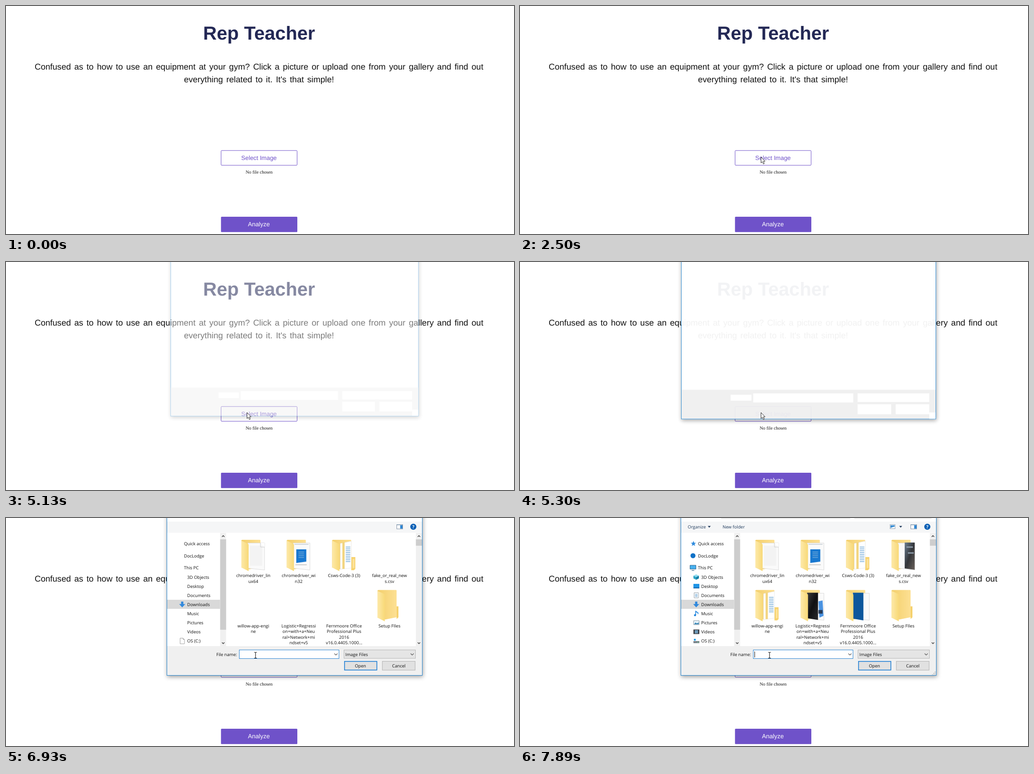
Recreate the animation shown at these times as an HTML page. Size 1116 px wide and 502 px high, loop 8000 ms.

```html
<!DOCTYPE html>
<html lang="en">
<head>
<meta charset="utf-8">
<title>Image upload demo</title>
<style>
  html, body { margin: 0; width: 100%; height: 100%; overflow: hidden; background: #fff; }
  svg { display: block; width: 100%; height: 100%; }
  text { text-rendering: geometricPrecision; }
  .page { font-family: "Liberation Sans", Arial, sans-serif; }
  .mid { text-anchor: middle; }
  .intro { font-size: 18.6px; word-spacing: 2.19px; fill: #111; }
  .ui { font: 9.55px "Open Sans", "Noto Sans", sans-serif; fill: #111; }
  .chev { fill: none; stroke: #444; stroke-width: 1.1; }
  .blank { fill: #fff; }
</style>
</head>
<body>
<svg viewBox="0 0 1116 502" xmlns="http://www.w3.org/2000/svg">
  <defs>
    <filter id="shadow" x="-10%" y="-10%" width="120%" height="125%">
      <feDropShadow dx="1" dy="3" stdDeviation="5" flood-color="#000" flood-opacity=".38"/>
    </filter>
    <linearGradient id="back"><stop offset="0" stop-color="#f3cf6c"/><stop offset="1" stop-color="#fde093"/></linearGradient>
    <linearGradient id="flap"><stop offset="0" stop-color="#fde9a9"/><stop offset="1" stop-color="#f8d978"/></linearGradient>
    <linearGradient id="dusk" x2="1" y2="1"><stop offset="0" stop-color="#6c7f92"/><stop offset=".5" stop-color="#333539"/><stop offset="1" stop-color="#6b625c"/></linearGradient>
    <linearGradient id="night" x2="1" y2="1"><stop offset="0" stop-color="#3a3a3c"/><stop offset=".5" stop-color="#101012"/><stop offset="1" stop-color="#29292c"/></linearGradient>
  </defs>
  <rect width="1116" height="502" fill="#fff"/>

  <g class="page mid">
    <text x="556" y="74" font-size="41.5" font-weight="700" fill="#232855">Rep Teacher</text>
    <text class="intro" x="555.8" y="140">Confused as to how to use an equipment at your gym? Click a picture or upload one from your gallery and find out</text>
    <text class="intro" x="555.8" y="167.5">everything related to it. It's that simple!</text>
    <rect x="472.5" y="318.2" width="167" height="32.5" rx="1.5" fill="#fff" stroke="#6f52c9"/>
    <text x="555.8" y="339" font-size="13.35" fill="#6f52c9">Select Image</text>
    <text x="556" y="369" font-size="10.1" fill="#111" font-family="Liberation Serif, Times, serif">No file chosen</text>
    <rect x="472.3" y="464" width="167.7" height="33.7" rx="1.5" fill="#6f52c9"/>
    <text x="555.6" y="485" font-size="13.5" fill="#fff">Analyze</text>
  </g>

  <g id="dialog">
    <rect x="353.5" y="-40" width="561" height="386.5" fill="#fff" stroke="#2484cf" filter="url(#shadow)"/>
    <rect x="354" y="282" width="560" height="64" fill="#f0f0f0"/>
    <g id="blanks">
      <path class="blank" d="M462 293h46v13h-46zM512 290h220.500v20h-220.500zM742 290h158v19h-158zM742 314h74v22h-74zM826 314h74v22h-74zM900 332h14v14h-14z"/>
      <g id="bar">
        <rect x="900.500" y="47" width="13.500" height="221" fill="#f0f0f0"/>
        <rect x="900.500" y="47" width="13.500" height="104" fill="#cdcdcd"/>
      </g>
    </g>
    <g id="full">
      <rect x="354" y="8" width="560" height="24.500" fill="#f5f6f7"/>
      <g fill="#f0f0f0"><rect x="470.500" y="33" width="13" height="249"/><rect x="900.500" y="33" width="13.500" height="249"/></g>
      <g fill="#cdcdcd"><rect x="470.500" y="47" width="13" height="199"/><rect x="900.500" y="47" width="13.500" height="14"/></g>
      <path class="chev" style="stroke-width:1.6" d="M474.500 41.500l2.700-2.700 2.700 2.700M474.500 274l2.700 2.700 2.700-2.700M904.500 41.500l2.700-2.700 2.700 2.700M904.500 274l2.700 2.700 2.700-2.700"/>
      <rect x="354" y="180" width="116" height="20" fill="#d9d9d9"/>
      <g id="side" class="ui"></g>
      <path d="M384.600 184h5v5.500h4.200l-6.700 7.300-6.700-7.300h4.200z" fill="#3289dc"/>
      <path id="doc" d="M382.500 264.500h6.500l3 3v9.500h-9.500zM389 264.500v3h3" fill="#fff" stroke="#888" stroke-width=".8"/>
      <g id="names" class="ui mid"></g>
      <rect x="858.500" y="14.500" width="13" height="9.500" fill="#fff" stroke="#7c8fa3"/>
      <rect x="866" y="16" width="5" height="7.500" fill="#2f86d3"/>
      <path d="M859 15h12" stroke="#8ca6bd" stroke-width="1.500"/>
      <circle cx="894.800" cy="19.200" r="6.700" fill="#0b60b5"/>
      <text class="mid" x="894.800" y="22.900" font-size="10" font-weight="700" fill="#fff" font-family="Open Sans, sans-serif">?</text>
      <text class="ui" x="462" y="303.500">File name:</text>
      <rect x="512.500" y="290.500" width="219" height="19" fill="#fff" stroke="#2a84d2"/>
      <rect x="742.500" y="290.500" width="157" height="18.500" fill="#e5e5e5" stroke="#b5b5b5"/>
      <path class="chev" d="M721.500 298.500l3.300 3.300 3.300-3.300M889 298.500l3.300 3.300 3.300-3.300"/>
      <text class="ui" x="745.500" y="303.500">Image Files</text>
      <rect x="743.700" y="315.700" width="71" height="19" fill="#e1e1e1" stroke="#1a7cd4" stroke-width="1.600"/>
      <rect x="826.800" y="315.500" width="72" height="19.500" fill="#e1e1e1" stroke="#b0b0b0"/>
      <text class="ui mid" x="778.700" y="328.500">Open</text>
      <text class="ui mid" x="863" y="328.500">Cancel</text>

      <g id="tools">
        <path d="M442 .5h283.500M734.500 .5h169.500" stroke="#d4d4d4"/>
        <g class="ui" style="fill:#1e395b">
          <text x="368.500" y="22.500">Organize</text>
          <text x="445" y="22.500">New folder</text>
        </g>
        <path d="M412.500 17.500h6.600l-3.300 3.800zM833 17.500h6.600l-3.300 3.800z" fill="#1e395b"/>
        <rect x="813" y="14.500" width="11" height="9" fill="#fff" stroke="#8ca0b3"/>
        <path d="M814 16h9v3l-4 1-5 2z" fill="#3d8fd4"/>
        <path d="M911 338h2v2h-2zM911 341h2v2h-2zM908 341h2v2h-2zM911 344h2v1.500h-2zM908 344h2v1.500h-2zM905 344h2v1.500h-2z" fill="#bfbfbf"/>

        <path d="M381 50.500l1.600 3.900 4.100.3-3.200 2.600 1.100 4.200-3.600-2.300-3.600 2.300 1.100-4.200-3.200-2.600 4.100-.3z" fill="#2f8bdd"/>
        <circle cx="380" cy="83" r="5.500" fill="#1071c7"/>
        <path d="M373.500 104h13v8.500h-13z" fill="#47b0ee" stroke="#39678c"/>
        <path d="M377 115.500h6" stroke="#39678c" stroke-width="1.300"/>
        <path d="M381 127l6-3 6 3-6 3z" fill="#8fdcf0"/><path d="M381 127l6 3v6l-6-3z" fill="#2ba4c6"/><path d="M393 127l-6 3v6l6-3z" fill="#147fa6"/>
        <path d="M381 145h13v10h-13z" fill="#1f95e6"/><path d="M381 153h13v2h-13z" fill="#1266ad"/>
        <path d="M382.500 164.500h9.500v11.500h-9.500z" fill="#fff" stroke="#8a969f" stroke-width=".9"/>
        <path d="M384.500 168h5.500M384.500 170.500h5.500M384.500 173h5.500" stroke="#4d93ca"/>
        <path d="M386 213.500v-9q1 3 5 4v3" fill="none" stroke="#1d83dc" stroke-width="1.600"/><circle cx="384.500" cy="214" r="2.300" fill="#1d83dc"/>
        <path d="M381.500 226h12v9h-12z" fill="#eaf5fc" stroke="#8999a5"/><path d="M382.500 234l3-4 3 2 4-2v4z" fill="#3686b5"/>
        <path d="M381 245.500h13v10h-13z" fill="#3d4248"/><path d="M384 247h7v7h-7z" fill="#6b98b8"/>
        <path d="M381 271h13v4.500h-13z" fill="#778088"/><path d="M382 266h4v4h-4z" fill="#23a0e5"/><path d="M390 273h2v1.200h-2z" fill="#6cf08c"/>
      </g>
      <g id="folders"></g>
      <path id="caret" d="M515.600 294v13" stroke="#000"/>
    </g>
  </g>

  <path id="arrow" d="M.5 .5V13.600L3.500 10.800 5.600 15.800 7.800 14.800 5.700 9.900H9.400Z" fill="#fff" stroke="#111" stroke-width=".9"/>
  <path id="beam" d="M545.200 295.700h2.200l.8.700.8-.7h2.200M548.200 296.400v11.400M545.200 308.500h2.200l.8-.7.8.7h2.200" fill="none" stroke="#111" stroke-width="1.100"/>
  <g id="ring" fill="none" stroke-width="3.200">
    <circle r="4.900" stroke="#2196e5"/>
    <path d="M-4.900 0A4.900 4.900 0 0 1 0 -4.900" stroke="#67bdf1"/>
  </g>
</svg>

<script>
const LOOP = 8000;
const $ = id => document.getElementById(id);

// Sidebar: label, x, vertical centre
const places = [
  ["Quick access", 391, 56], ["DocLodge", 391, 83], ["This PC", 391, 109.5],
  ...["3D Objects", "Desktop", "Documents", "Downloads", "Music", "Pictures", "Videos", "OS (C:)"]
    .map((name, i) => [name, 398, 130 + i * 20.08])
];
$("side").innerHTML = places
  .map(([name, x, y]) => `<text x="${x}" y="${y + 3.5}">${name}</text>`).join("");

const sheet = '<path d="M14 7h37v59.500l-37-4z" fill="#fafafa" stroke="#d2d2d2" stroke-width=".8"/>';
const lines = (x, y, n, w) => Array.from({ length: n }, (_, i) =>
  `<path d="M${x} ${y + i * 4}h${w}" stroke="#6fa9d8" stroke-width="1.500"/>`).join("");
const stack = '<path d="M42 38h9v26l-3 3h-6z" fill="#f7d36f"/>' +
  '<path d="M18 8l24-5v59l-24 3z" fill="#fff" stroke="#ddd" stroke-width=".6"/>' +
  '<path d="M25 5v59" stroke="#f2d581" stroke-width="5"/>' +
  lines(30, 16, 9, 10) + '<path d="M47 42v20" stroke="#fde39b" stroke-width="4"/>';

const inserts = {
  paper: sheet + '<path d="M19 13h27v44h-27z" fill="#f3f3f3"/><path d="M42 7l9 9v-9z" fill="#fff"/><path d="M42 7v9h9" fill="none" stroke="#ccc"/>',
  app: sheet + '<path d="M17 10h31" stroke="#cfd6dc" stroke-width="2"/><path d="M21 21h22v27l-22 3z" fill="#1878d0"/>' + lines(26, 27, 4, 12) + '<path d="M19 55h25" stroke="#ccc" stroke-width="2"/>',
  stack,
  dusk: sheet + '<path d="M29 6h22v60l-22-3z" fill="url(#dusk)"/><path d="M33 16h14M36 29h13" stroke="#8c9aa8" stroke-width="3"/>',
  night: sheet + '<path d="M14 6h24v60l-24-4z" fill="url(#night)"/><path d="M39 25l9-2 2 34-9 4z" fill="#4a93e2"/><path d="M39 44h9v8h-9z" fill="#273a55"/>',
  blue: sheet + '<path d="M15 6h23v61l-23-4z" fill="#0d579c"/>',
  empty: '<path d="M42 36h4v24l-4 4z" fill="#f5d06a"/>'
};

const files = [
  ["paper", "chromedriver_lin", "ux64"],
  ["app", "chromedriver_wi", "n32"],
  ["stack", "Csws-Code-3 (3)"],
  ["dusk", "fake_or_real_new", "s.csv"],
  ["stack", "willow-app-engi", "ne"],
  ["night", "Logistic+Regressi", "on+with+a+Neu", "ral+Network+mi", "ndset+v5"],
  ["blue", "Fernmoore Office", "Professional Plus", "2016", "v16.0.4405.1000..."],
  ["empty", "Setup FIles"]
];

files.forEach(([kind, ...label], i) => {
  const col = i % 4, row = Math.floor(i / 4);
  const x = 517 + col * 99.7, y = 48 + row * 110.6;
  $("names").innerHTML += label.map((line, n) =>
    `<text x="${x + 26.3}" y="${y + 82 + n * 12.5}">${line}</text>`).join("");
  $("folders").innerHTML += `<g transform="translate(${x} ${y})">
    <path d="M0 1l2-1h39l1 1v59l-25 5-17-4z" fill="url(#back)"/>${inserts[kind]}
    <path d="M0 2l14.500 6.500q1.500 1 1.500 3v57.500l-16-8z" fill="url(#flap)"/></g>`;
});
const folders = [...$("folders").children];

// Pointer: time, x, y
const moves = [
  [410, 971, 452], [640, 770, 388], [870, 590, 325], [1100, 486, 302], [1330, 519, 329],
  [1570, 525, 331], [1820, 529, 332], [4590, 529, 331], [5770, 538, 315],
  [6000, 544, 303], [6230, 546.5, 301]
];
const busy = [[2270, 2500], [3060, 3200], [4360, 4840]];
// Dialog: time, opacity, scale
const opening = [[5130, .45, .97], [5300, .945, .9965], [5530, 1, 1]];

const latest = (list, t) => list.filter(item => item[0] <= t).pop();
const show = (el, on) => el.style.display = on ? "" : "none";

function render(t) {
  const pos = latest(moves, t);
  const open = latest(opening, t);
  const loaded = t >= 6930;

  show($("dialog"), open);
  if (open) {
    const [, alpha, k] = open;
    $("dialog").setAttribute("opacity", alpha);
    $("dialog").setAttribute("transform", `translate(634 100) scale(${k}) translate(-634 -100)`);
  }
  show($("blanks"), !loaded);
  show($("bar"), t >= 6460);
  show($("full"), loaded);
  show($("tools"), t >= 7160);
  show($("doc"), t < 7160);
  // The first pass already has these four previews
  folders.forEach((f, i) => show(f, t >= 7390 || [0, 1, 2, 7].includes(i)));
  show($("caret"), t >= 7890);

  show($("arrow"), pos && !loaded);
  show($("beam"), loaded);
  const waiting = busy.some(([from, to]) => t >= from && t < to);
  show($("ring"), waiting);
  if (pos) {
    const [, x, y] = pos;
    $("arrow").setAttribute("transform", `translate(${x} ${y})`);
    $("ring").setAttribute("transform", `translate(${x + 12} ${y + 1.3})`);
  }
}

const start = performance.now();
function tick(now) {
  render(Math.max(0, now - start) % LOOP);
  requestAnimationFrame(tick);
}
render(0);
requestAnimationFrame(tick);
</script>
</body>
</html>
```
